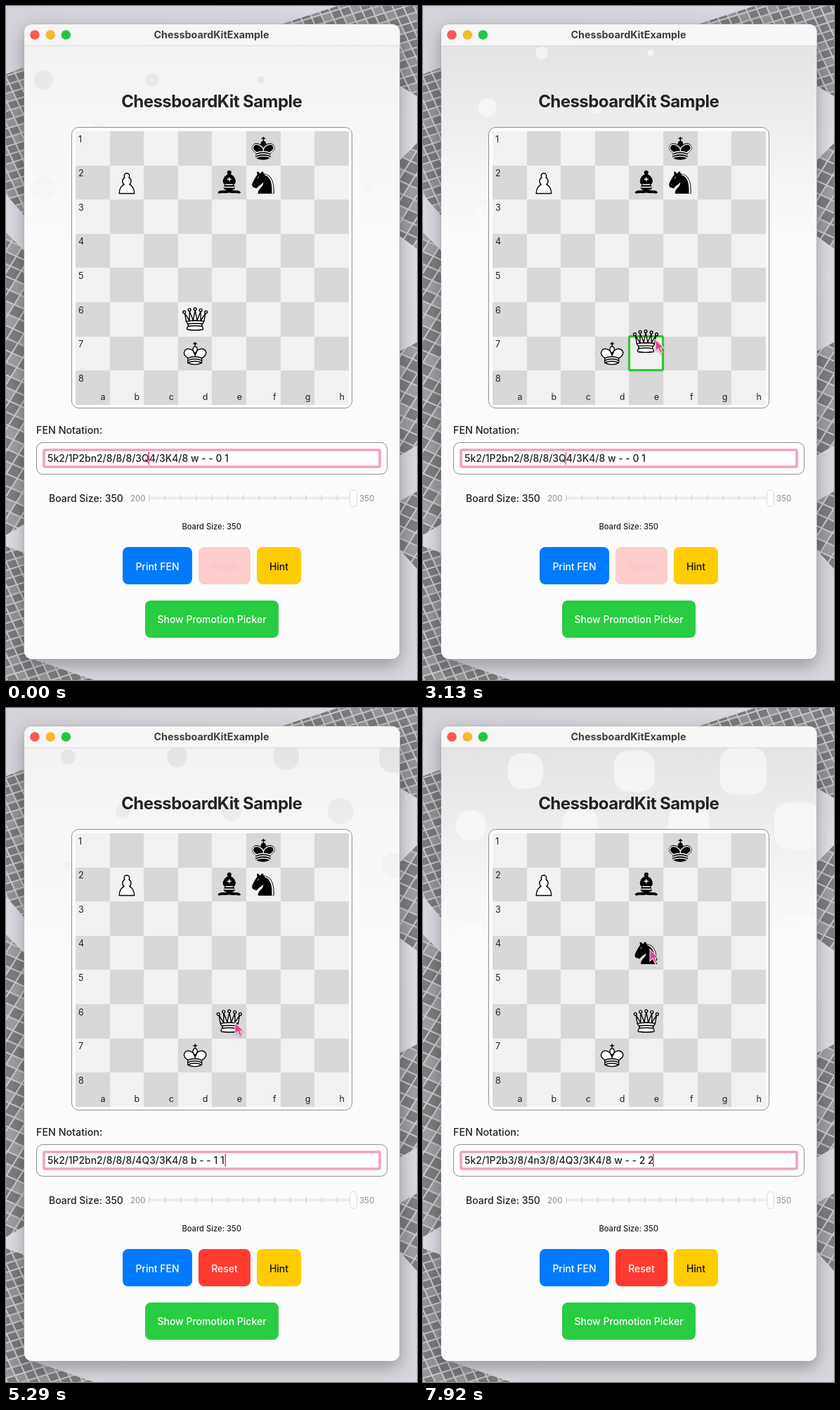
An HTML page with a canvas that plays this animation: 585 px wide and 958 px high, repeating every 8000 ms.

```html
<!DOCTYPE html>
<html lang="en">
<head>
<meta charset="utf-8">
<title>ChessboardKit Sample</title>
<style>
  html, body { margin: 0; width: 100%; height: 100%; overflow: hidden; background: #d9d8de; }
  svg, canvas { position: absolute; left: 0; top: 0; }
  svg { font-family: Inter, Roboto, sans-serif; font-size: 14px; font-weight: 500; fill: #222; }
  #field { left: 26px; top: 57px; border-radius: 0 0 11px 11px; }
  .win { filter: drop-shadow(0 9px 13px rgba(0, 0, 0, .3)); }
  .mid { text-anchor: middle; }
  .end { text-anchor: end; }
  .small { font-size: 11.2px; }
  .line { fill: none; stroke: #8f8f8f; }
  .white { fill: #fff; }
  .piece { stroke: #000; stroke-width: 1.5; stroke-linejoin: round; stroke-linecap: round; }
  .thin { fill: none; stroke: #fff; }
</style>
</head>
<body>
<svg width="585" height="958">
  <defs>
    <linearGradient id="wall" x2=".3" y2="1">
      <stop stop-color="#d3d2d8"/><stop offset=".5" stop-color="#e1e0e6"/><stop offset="1" stop-color="#d8d7dd"/>
    </linearGradient>
    <pattern id="small" width="42" height="24" patternUnits="userSpaceOnUse" patternTransform="rotate(-17) skewX(8)">
      <rect width="42" height="24" fill="#c9c8cd"/>
      <path d="M0 0h12v10H0zM14 0h12v10H14zM0 12h12v10H0zM28 12h12v10H28z" fill="#7b7a7e"/>
      <path d="M28 0h12v10H28zM14 12h12v10H14z" fill="#96959a"/>
    </pattern>
    <pattern id="big" width="51" height="32" patternUnits="userSpaceOnUse" patternTransform="rotate(24) skewX(-8)">
      <rect width="51" height="32" fill="#cdccd1"/>
      <path d="M0 0h15v14H0zM34 0h15v14H34zM0 16h15v14H0zM17 16h15v14H17z" fill="#7e7d81"/>
      <path d="M17 0h15v14H17zM34 16h15v14H34z" fill="#a09fa4"/>
    </pattern>
  </defs>
  <rect width="585" height="958" fill="url(#wall)"/>
  <path fill="url(#small)" d="M385 28L472 0H585V128L558 112V28zM0 97L28 86V300L0 268zM0 768L28 778V925L125 958H0z"/>
  <path fill="url(#big)" d="M0 322L28 350V735L0 752zM558 222L585 195V345L558 325zM558 492L585 478V625L558 640zM558 705L585 690V800L558 770z"/>
  <rect class="win" x="26" y="26" width="534.5" height="902" rx="11" fill="#fcfcfc" stroke="#aaa" stroke-width=".8"/>
</svg>
<canvas id="field" width="534" height="871"></canvas>
<svg id="ui" width="585" height="958">
  <path d="M26 57V37a11 11 0 0 1 11-11H549.500a11 11 0 0 1 11 11V57z" fill="#f6f6f6"/>
  <path d="M26 56.500H560.500" stroke="#d9d9d9"/>
  <circle cx="41" cy="41" r="6.800" fill="#f65b53"/>
  <circle cx="63.300" cy="41" r="6.800" fill="#f9b92c"/>
  <circle cx="85.400" cy="41" r="6.800" fill="#24c63f"/>
  <text class="mid" x="292.500" y="46" font-size="14.300" font-weight="700" fill="#3f3f3f">ChessboardKitExample</text>
  <text class="mid" x="292.700" y="144" font-size="24" font-weight="700" letter-spacing="-.55">ChessboardKit Sample</text>

  <rect class="line" x="93.500" y="172.500" width="399" height="399" rx="10" style="fill:#fcfcfc"/>
  <g id="board" font-size="12.500" font-weight="400"></g>
  <rect id="mark" width="48" height="48" rx="1.500" fill="none" stroke="#33c534" stroke-width="3.200"/>

  <text x="43" y="608" font-size="14.300">FEN Notation:</text>
  <rect class="line" x="43.500" y="620.500" width="499" height="45" rx="9" style="fill:#fdfdfd"/>
  <rect x="54" y="631" width="478" height="24" rx="1.500" fill="#fff" stroke="#f39fc5" stroke-width="3.600"/>
  <text id="fen" x="59" y="648" font-size="13.900"></text>
  <rect id="caret" y="634" width="1.600" height="18" fill="#e8407f"/>

  <text x="61" y="705">Board Size: 350</text>
  <g font-size="11.500" font-weight="400" fill="#8b8b8b">
    <text x="177" y="704">200</text><text x="503" y="704">350</text>
  </g>
  <rect x="203" y="697.500" width="292" height="3.500" rx="1.700" fill="#ececec"/>
  <g id="ticks" fill="#dedede"></g>
  <rect x="489.500" y="687.500" width="10" height="24" rx="5" fill="#fff" stroke="#d2d2d2" stroke-width=".8"/>
  <text class="mid small" x="292.700" y="744">Board Size: 350</text>

  <g class="mid">
    <rect x="166" y="769" width="99" height="53" rx="8" fill="#007aff"/>
    <text class="white" x="215.500" y="801.500">Print FEN</text>
    <rect id="reset" x="274" y="769" width="74" height="53" rx="8"/>
    <text id="resetText" x="311" y="801.500">Reset</text>
    <rect x="357" y="769" width="63" height="53" rx="8" fill="#fc0"/>
    <text x="388.500" y="801.500" fill="#111">Hint</text>
    <rect x="198" y="845" width="190" height="53" rx="8" fill="#28cd41"/>
    <text class="white" x="293" y="877">Show Promotion Picker</text>
  </g>

  <g id="pieces"></g>
  <path id="cursor" d="M0 0V16.500L4 13L7 19.500L9.800 18.300L7 12H12z" fill="#db4590" stroke="#f8d3e4" stroke-width="1.100"
    style="filter:drop-shadow(0 1px 1px rgba(0,0,0,.3))"/>
</svg>
<script>
const $ = id => document.getElementById(id);
const LOOP = 8000, CELL = 48.62, LEFT = 99, TOP = 178;
const mid = (col, row) => [LEFT + (col + .5) * CELL, TOP + (row + .5) * CELL];

function add(parent, tag, attrs, text = '') {
  const el = document.createElementNS('http://www.w3.org/2000/svg', tag);
  for (const k in attrs) el.setAttribute(k, attrs[k]);
  el.textContent = text;
  return parent.appendChild(el);
}

for (let i = 0; i < 64; i++) {
  const col = i % 8, row = i >> 3;
  add($('board'), 'rect', {
    x: LEFT + col * CELL, y: TOP + row * CELL, width: CELL, height: CELL,
    fill: (col + row) % 2 ? '#d8d8d8' : '#f1f1f1', 'shape-rendering': 'crispEdges'
  });
}
for (let i = 0; i < 8; i++) {
  add($('board'), 'text', { x: 103, y: 193.5 + i * CELL }, i + 1);
  add($('board'), 'text', { x: LEFT + (i + 1) * CELL - 6, y: 560, class: 'end' }, 'abcdefgh'[i]);
}
for (let i = 0; i < 14; i++) add($('ticks'), 'rect', { x: 203 + i * 22.3, y: 695, width: 2, height: 8.5, rx: 1 });

// Piece outlines on a 45-unit square: [body, detail lines, filled highlights]
const kingBody = 'M22.5 11.63V6M20 8h5M22.5 25s4.5-7.5 3-10.5c0 0-1-2.5-3-2.5s-3 2.5-3 2.5c-1.5 3 3 10.5 3 10.5M11.5 37c5.5 3.5 15.5 3.5 21 0v-7s9-4.5 6-10.5c-4-6.5-13.5-3.5-16 4V27v-3.5c-3.5-7.5-13-10.5-16-4-3 6 5 10 5 10V37z';
const kingBase = 'M11.5 30c5.5-3 15.5-3 21 0m-21 3.5c5.5-3 15.5-3 21 0m-21 3.5c5.5-3 15.5-3 21 0';
const dot = (x, y) => `M${x + 2} ${y}a2 2 0 1 1-4 0 2 2 0 1 1 4 0z`;
const shapes = {
  pawn: ['M22.5 9c-2.21 0-4 1.79-4 4 0 .89.29 1.71.78 2.38C17.33 16.5 16 18.59 16 21c0 2.03.94 3.84 2.41 5.03-3 1.06-7.41 5.55-7.41 13.47h23c0-7.92-4.41-12.41-7.41-13.47 1.47-1.19 2.41-3 2.41-5.03 0-2.41-1.33-4.5-3.28-5.62.49-.67.78-1.49.78-2.38 0-2.21-1.79-4-4-4z'],
  king: [kingBody, kingBase],
  darkKing: [kingBody, kingBase + 'M32 29.5s8.5-4 6.03-9.65C34.15 14 25 18 22.5 24.5l.01 2.1-.01-2.1C20 18 9.906 14 6.997 19.85c-2.497 5.65 4.853 9 4.853 9'],
  queen: [dot(6, 12) + dot(14, 8.5) + dot(22.5, 7.5) + dot(31, 9) + dot(39, 12) +
    'M9 26c8.5-1.5 21-1.5 27 0l2-12-7 11V11l-5.5 13.5-3-15-3 15-5.5-14V25L7 14l2 12zM9 26c0 2 1.5 2 2.5 4 1 1.5 1 1 .5 3.5-1.5 1-1.5 2.5-1.5 2.5-1.5 1.5.5 2.5.5 2.5 6.5 1 16.5 1 23 0 0 0 1.5-1 0-2.5 0 0 .5-1.5-1-2.5-.5-2.5-.5-2 .5-3.5 1-2 2.5-2 2.5-4-8.5-1.5-18.5-1.5-27 0z',
    'M11.5 30c3.5-1 18.5-1 22 0M12 33.5c6-1 15-1 21 0'],
  bishop: ['M9 36c3.39-.97 10.11.43 13.5-2 3.39 2.43 10.11 1.03 13.5 2 0 0 1.65.54 3 2-.68.97-1.65.99-3 .5-3.39-.97-10.11.46-13.5-1-3.39 1.46-10.11.03-13.5 1-1.354.49-2.323.47-3-.5 1.354-1.94 3-2 3-2zM15 32c2.5 2.5 12.5 2.5 15 0 .5-1.5 0-2 0-2 0-2.5-2.5-4-2.5-4 5.5-1.5 6-11.5-5-15.5-11 4-10.5 14-5 15.5 0 0-2.5 1.5-2.5 4 0 0-.5.5 0 2zM25 8a2.5 2.5 0 1 1-5 0 2.5 2.5 0 1 1 5 0z',
    'M17.5 26h10M15 30h15m-7.5-14.5v5M20 18h5'],
  knight: ['M22 10c10.5 1 16.5 8 16 29H15c0-9 10-6.5 8-21M24 18c.38 2.91-5.55 7.37-8 9-3 2-2.82 4.34-5 4-1.042-.94 1.41-3.04 0-3-1 0 .19 1.23-1 2-1 0-4.003 1-4-4 0-2 6-12 6-12s1.89-1.9 2-3.5c-.73-.994-.5-2-.5-3 1-1 3 2.5 3 2.5h2s.78-1.992 2.5-3c1 0 1 3 1 3', '',
    'M9.5 25.5a.5.5 0 1 1-1 0 .5.5 0 1 1 1 0zm5.433-9.75a.5 1.5 30 1 1-.866-.5.5 1.5 30 1 1 .866.5zM24.55 10.4l-.45 1.45.5.15c3.15 1 5.65 2.49 7.9 6.75S35.75 29.06 35.25 39l-.05.5h2.25l.05-.5c.5-10.06-.88-16.85-3.25-21.34-2.37-4.49-5.79-6.64-9.19-7.16l-.51-.1z']
};

const place = (el, [x, y]) => el.setAttribute('transform', `translate(${x} ${y}) scale(.94) translate(-22.5 -23)`);
function piece(name, dark, col, row) {
  const g = add($('pieces'), 'g', { class: 'piece', fill: dark ? '#000' : '#fff' });
  const [body, lines, light] = shapes[name];
  add(g, 'path', { d: body });
  if (lines) add(g, 'path', dark ? { d: lines, class: 'thin' } : { d: lines, fill: 'none' });
  if (light) add(g, 'path', { d: light, fill: '#fff', stroke: 'none' });
  place(g, mid(col, row));
  return g;
}
piece('darkKing', true, 5, 0);
piece('pawn', false, 1, 1);
piece('bishop', true, 4, 1);
piece('king', false, 3, 6);

const clamp = v => Math.min(1, Math.max(0, v));

// Eased position along [time, x, y] points
function along(keys, t) {
  let i = 0;
  while (i < keys.length - 2 && t > keys[i + 1][0]) i++;
  const [a, b] = [keys[i], keys[i + 1]];
  const u = clamp((t - a[0]) / (b[0] - a[0])), e = u * u * (3 - 2 * u);
  return [a[1] + (b[1] - a[1]) * e, a[2] + (b[2] - a[2]) * e];
}

const pointer = [
  [420, 400, 590], [1000, 250, 446], [1300, 250, 446], [1700, 345, 432], [2200, 438, 440],
  [2650, 390, 478], [3130, 331, 474], [3550, 380, 462], [4040, 333, 433], [4350, 326, 447],
  [5300, 326, 447], [5960, 367, 255], [6100, 367, 255], [6380, 408, 215], [6790, 303, 309],
  [7150, 222, 325], [7650, 323, 343], [8000, 323, 343]
];
const moves = [
  { el: piece('queen', false, 3, 5), from: mid(3, 5), to: mid(4, 5), grab: 1320, drop: 4650,
    hold: [[1320, 19, -.6], [1700, -14, 3], [3130, -14, 3], [4040, -7, -1]] },
  { el: piece('knight', true, 5, 1), from: mid(5, 1), to: mid(4, 3), grab: 6120, drop: 7920,
    hold: [[6120, -.7, -4], [6790, -4, -19], [7600, -6, 0]] }
];
const states = [
  { at: 0, fen: '5k2/1P2bn2/8/8/8/3Q4/3K4/8 w - - 0 1', caret: 202.5 },
  { at: 4650, fen: '5k2/1P2bn2/8/8/8/4Q3/3K4/8 b - - 1 1', caret: 311.5 },
  { at: 7920, fen: '5k2/1P2b3/8/4n3/8/4Q3/3K4/8 w - - 2 2', caret: 327 }
];

// Drifting checker field that floods alternately with a darker and a lighter tone
const ctx = $('field').getContext('2d');
ctx.translate(-26, -57);
function tone(top) {
  const g = ctx.createLinearGradient(0, 57, 0, 335);
  g.addColorStop(0, top);
  g.addColorStop(1, '#fcfcfc');
  return g;
}
const tones = [tone('#e4e4e4'), tone('#f2f2f2')];
const STEP = 77.5, HALF = STEP / 2, WAVE = 3.16;

function blob(x, y, h, fill) {
  if (h <= 0) return;
  ctx.fillStyle = fill;
  ctx.beginPath();
  ctx.roundRect(x - h, y - h, 2 * h, 2 * h, h * (1 - .5 * clamp((h - 14) / 24)));
  ctx.fill();
}
function square(x, y, fill) {
  ctx.fillStyle = fill;
  ctx.fillRect(x - HALF - .5, y - HALF - .5, STEP + 1, STEP + 1);
}
function flood(n, s) {
  const parity = Math.abs(n % 2), now = tones[parity], old = tones[1 - parity];
  const shift = 37.2 * s;
  const x0 = 53 - shift % (2 * STEP), y0 = 105 + shift % (2 * STEP);
  const holes = [];
  for (let j = -5; j < 5; j++) for (let i = -2; i < 10; i++) {
    const x = x0 + i * STEP, y = y0 + j * STEP;
    const r = 26 * (s + .47 - WAVE * n) - .026 * (x - y);
    const own = Math.abs(i + j) % 2 === parity;
    if (r > HALF) {
      square(x, y, now);
      if (!own) holes.push([x, y, STEP - r, old]);
    } else if (own) blob(x, y, r, now);
  }
  for (const hole of holes) blob(...hole);
}
function drawField(s) {
  const n = Math.floor((s + .47) / WAVE);
  ctx.fillStyle = tones[Math.abs(n % 2)];
  ctx.fillRect(26, 57, 535, 871);
  flood(n - 1, s);
  flood(n, s);
  for (const [x, y, h] of [[50, 405, 23], [125, 805, 32], [210, 795, 25], [513, 420, 12], [490, 880, 20]])
    blob(x, y, h, '#fbfbfb');
}

function render(t) {
  drawField(t / 1000);

  const tip = along(pointer, t);
  $('cursor').setAttribute('transform', `translate(${tip})`);
  $('cursor').style.display = t < 420 ? 'none' : '';

  let held = false;
  for (const m of moves) {
    let pos = t < m.grab ? m.from : m.to;
    if (t >= m.grab && t < m.drop) {
      const off = along(m.hold, t);
      pos = [tip[0] + off[0], tip[1] + off[1]];
      held = true;
    }
    place(m.el, pos);
  }
  const cell = (v, start) => start + Math.floor((v - start) / CELL) * CELL;
  $('mark').style.display = held ? '' : 'none';
  $('mark').setAttribute('x', cell(tip[0], LEFT));
  $('mark').setAttribute('y', cell(tip[1], TOP));

  const state = states.filter(s => t >= s.at).pop();
  $('fen').textContent = state.fen;
  $('caret').setAttribute('x', state.caret);
  const beat = (t - state.at) / 850 % 1;
  $('caret').style.opacity = clamp((Math.abs(beat - .5) - .12) / .08);

  const active = state.at > 0;
  $('reset').setAttribute('fill', active ? '#ff3b30' : '#fdcecb');
  $('resetText').setAttribute('fill', active ? '#fff' : '#fcc3c0');
}

function frame(now) {
  render(now % LOOP);
  requestAnimationFrame(frame);
}
render(0);
requestAnimationFrame(frame);
</script>
</body>
</html>
```
